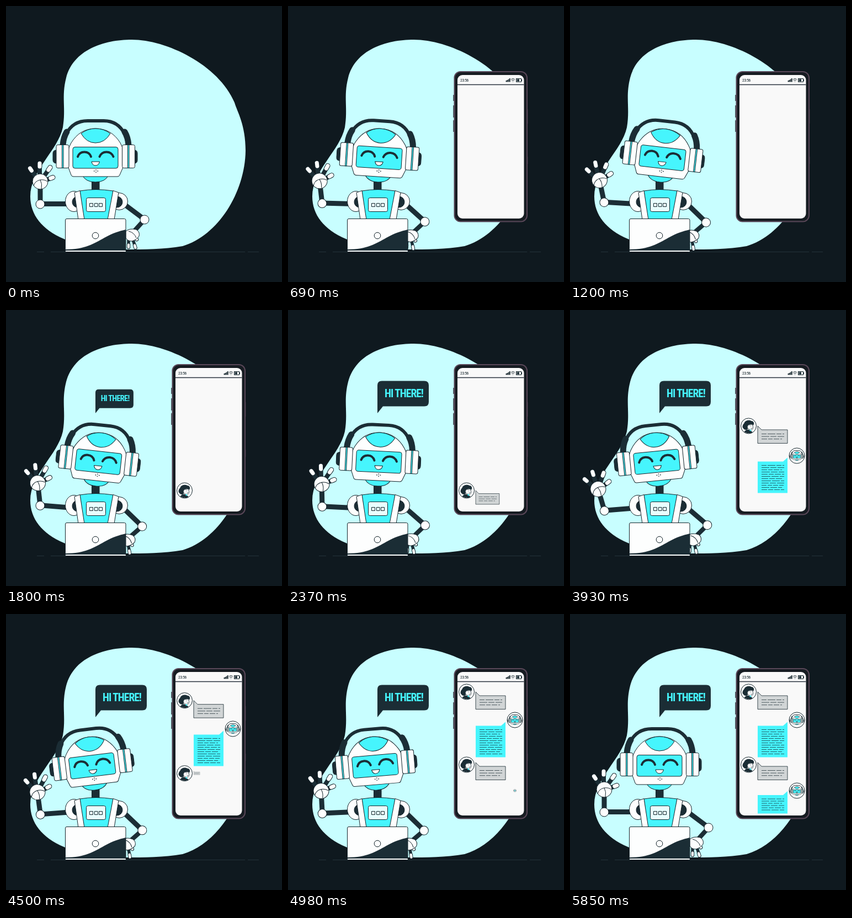
An HTML page that plays this animation: 500x500 px, repeating every 6120 ms.

```html
<!DOCTYPE html>
<html lang="en">
<head>
<meta charset="utf-8">
<title>Robot chat</title>
<style>
  html, body { margin: 0; width: 100%; height: 100%; overflow: hidden; background: #0f191f; }
  svg { display: block; width: 100vw; height: 100vh; }
  .ink { stroke: #14242b; stroke-width: 1; stroke-linejoin: round; }
  .w { fill: #fdfefe; }
  .c { fill: #46f5fd; }
  .d { fill: #1b2d35; }
  .bar { stroke: #1b2d35; fill: none; }
  .round { stroke-linecap: round; }
  text {
    font-family: "Roboto Condensed", "Liberation Sans Narrow", Roboto, "Liberation Sans", sans-serif;
    font-stretch: 75%; letter-spacing: -.05em; stroke: none; dominant-baseline: central;
  }
</style>
</head>
<body>
<svg viewBox="0 0 500 500">
  <path fill="#c8feff" d="M228 61C290 61 385 106 414 175C419 192 434 215 434 262C433 338 384 416 320 435C285 441 250 441 217 441C170 441 135 437 105 422C65 405 44 378 44 345C44 298 94 262 103 220C109 185 100 165 109 130C122 80 176 61 228 61Z"/>
  <path stroke="#24333a" d="M56 445.5H69M81 445.5H433M438 445.5H458"/>

  <g id="speech">
    <path class="d" d="M170 128.500H247Q255 128.500 255 136.500V166.500Q255 174.500 247 174.500H172L162 187V136.500Q162 128.500 170 128.500Z"/>
    <text x="175" y="151.500" font-size="25" font-weight="700" fill="#46f5fd" data-fit="70">HI THERE!</text>
  </g>

  <g id="phone">
    <path stroke="#2b2a35" stroke-width="1.500" d="M300 141V152M300 160V182M300 187V208M434 167V193M434 253V266"/>
    <rect x="301.500" y="99" width="131.500" height="271.500" rx="11" fill="#171c22" stroke="#594758" stroke-width="2"/>
    <rect x="307" y="105" width="120.500" height="260" rx="9" fill="#f9f9f9"/>
    <path stroke="#28313d" stroke-width="1.400" d="M307 122.500H427.500"/>
    <text x="312" y="114.500" font-size="8" fill="#14242b" data-fit="15">23:56</text>
    <path stroke="#14242b" stroke-width="1.700" d="M395.500 117.500V115M397.500 117.500V114M399.600 117.500V112.500M401.800 117.500V111"/>
    <path stroke="#14242b" fill="none" d="M404 113.500Q407.500 109.500 411 113.500M405.300 115.200Q407.500 112.700 409.700 115.200M407 117H408"/>
    <rect x="413.500" y="111.500" width="9" height="6" fill="none" stroke="#14242b"/>
    <path class="d" d="M414.500 112.500H419V116.500H414.500ZM423 113H424V116H423Z"/>
    <g id="chat"></g>
  </g>

  <g class="ink">
    <g id="armR">
      <path class="bar" stroke-width="9" d="M210 356L250 386"/>
      <path class="bar" stroke-width="8" d="M250 388L232 408"/>
      <circle class="w" cx="251" cy="387" r="8"/>
      <g id="handR"></g>
      <path class="w" d="M217 408Q224 402 236 405Q243 409 241 417Q236 424 228 426Q220 426 217 420Z"/>
      <path fill="none" d="M222 408Q232 410 236 420"/>
    </g>
    <circle class="w" cx="205" cy="354" r="15.500"/>
    <circle class="d" cx="201" cy="355" r="10"/>

    <g id="armL">
      <path class="bar" stroke-width="9" d="M62 358.500H118"/>
      <g id="fore">
        <path class="bar" stroke-width="9" d="M62 357V328"/>
        <g id="handL"></g>
        <circle class="w" cx="62" cy="318" r="14"/>
        <path fill="none" d="M50 326Q52 317 62 315Q70 314 75 318M62 315Q66 322 64 331"/>
      </g>
      <circle class="w" cx="62" cy="359" r="8"/>
    </g>
    <ellipse class="w" cx="123" cy="354" rx="15.500" ry="18.500"/>
    <circle class="d" cx="130" cy="355" r="10"/>

    <rect class="d" x="155.500" y="316" width="13.500" height="18"/>
    <path class="c" d="M134 335Q162 330 194 335L186 387H141Z"/>
    <path class="w" d="M124 338L134 334.500L142 387H131ZM194 334.500L204 338L196 387H184Z"/>
    <rect x="145.500" y="347.500" width="35" height="25" rx="3" fill="#e9ffff"/>
    <path fill="#e9ffff" d="M151.500 357.500h6v6h-6zM160.500 357.500h5.500v6h-5.500zM168.500 357.500h6v6h-6z"/>

    <g id="headTilt">
      <g id="head">
        <path class="c" d="M138 306Q144 319 162 319Q180 319 186 306Z"/>
        <path class="bar" stroke-width="6" d="M109 232C118 214 132 208 148 208H177C193 208 206 214 215 232"/>
        <path class="bar round" stroke-width="11" d="M103 252Q104 238 110 228M222 252Q221 238 215 228"/>
        <path class="d" d="M92 261Q85 261 85 267V279Q85 285 92 285ZM232 261Q238 261 238 267V279Q238 285 232 285Z"/>
        <path class="w" d="M112 290Q109 262 118 248Q134 222 162 222Q191 222 207 248Q216 262 213 290L206 306Q205 309 202 309H122Q119 309 118 306Z"/>
        <path class="c" d="M136 231Q148 222 162 222Q177 222 189 231Q179 248 162 248Q146 248 136 231Z"/>
        <rect class="c" x="121" y="255.500" width="82" height="38.500" rx="4"/>
        <path class="bar round" stroke-width="4" d="M130 273Q133 264.500 142 264.500Q151 264.500 154 273M169.500 273Q173 264.500 182 264.500Q191 264.500 194.500 273"/>
        <path class="w" d="M155 282H169.500Q168 289 162 289Q156.500 289 155 282Z"/>
        <path class="bar round" stroke-width="1.700" d="M163 297h.1M159.700 299h.1M166.200 299h.1M163 301h.1"/>
        <rect class="w" x="91" y="251.500" width="23" height="42" rx="3"/>
        <rect class="w" x="210.500" y="251.500" width="23" height="42" rx="3"/>
        <path class="c" d="M101.500 251.500h2.500v42h-2.500zM220.500 251.500h2.500v42h-2.500z"/>
      </g>
    </g>

    <rect class="w" x="107.500" y="385.500" width="109.500" height="60" rx="2.500"/>
    <path class="d" stroke="none" d="M108 441C143 441 160 430 178 420C194 411 205 408 217 405V443H108Z"/>
    <path stroke="#fdfefe" stroke-width="1.500" d="M108 444.200H217"/>
    <circle class="w" cx="162" cy="416" r="5.800"/>
  </g>
</svg>
<script>
const $ = id => document.getElementById(id);
const LOOP = 6120, END = 5850, STEP = 30;

const smooth = p => (p = Math.min(1, Math.max(0, p)), p * p * (3 - 2 * p));
const ramp = (t, start, length) => smooth((t - start) / length);

// Eased path through [time, value] points
function track(t, keys) {
  let v = keys[0][1];
  for (let i = 1; i < keys.length; i++) {
    const [t0, v0] = keys[i - 1], [t1, v1] = keys[i];
    if (t >= t0) v = v0 + (v1 - v0) * ramp(t, t0, t1 - t0);
  }
  return v;
}

// Fingers: dark joint with a white outlined tip
function finger(x0, y0, x1, y1, width, tip) {
  const mx = x1 + (x0 - x1) * tip, my = y1 + (y0 - y1) * tip;
  const line = (x, y, color, w) =>
    `<path class="round" style="stroke:${color};stroke-width:${w}" d="M${x} ${y}L${x1} ${y1}"/>`;
  return line(x0, y0, '#1b2d35', width + 1) + line(mx, my, '#14242b', width + 2) + line(mx, my, '#fdfefe', width);
}
$('handL').innerHTML = [[55, 311, 43.5, 294], [61, 309, 61, 285], [67, 311, 80, 292.5], [68, 317, 85, 310.5]]
  .map(f => finger(...f, 7, .25)).join('');
$('handR').innerHTML = [[222, 419, 222, 437], [229, 420, 234.5, 438], [233, 415, 237, 423]]
  .map(f => finger(...f, 4.5, .25)).join('');

// Chat pieces, drawn around their own origin
function writing(count, top, step) {
  let rows = '';
  for (let i = 0; i < count; i++) {
    const y = top + i * step, end = i % 4 == 2 ? 384 : 388;
    rows += `<path stroke="#14242b" stroke-width=".7" stroke-dasharray="${9 + i * 5 % 9} 2 ${14 - i * 3 % 7} 2" d="M347 ${y}H${end}"/>`;
  }
  return rows;
}
const disc = '<circle class="w ink" r="14"/>';
const user = disc + `
  <path class="d" d="M-9 5C-13 2-10-3-8-5C-6-11 2-11 5-9C10-9 11-3 8-1L5-3L0-2L-1 4C-2 8-7 8-9 5Z"/>
  <path class="w ink" style="stroke-width:.7" d="M0-2Q4-1 7-3Q10 4 6 7Q3 8 1 6L-2 4Q-3 0 0-2Z"/>
  <path class="d" d="M-8 11Q-4 5 1 7Q6 9 7 12Q0 15-8 11Z"/>
  <path class="bar" stroke-width=".8" d="M3 1h1M6 0h1M4 4.500Q6 5 7 3.500"/>
  <path class="c" d="M1 8L4 6L5 10Z"/>`;
const robot = disc + '<use href="#head" class="ink" style="stroke-width:3.500" transform="scale(.165) translate(-162 -266)"/>';
const ask = '<path class="ink" style="stroke-width:.8" fill="#d1d5d6" d="M340-7L347 0H394V24.500H340Z"/>' + writing(3, 7.5, 4.6);
const reply = (height, rows) =>
  `<path class="c" d="M340 0H386L394-7V${height}H340Z"/>` + writing(rows, 7, 4);

// x and y of the pop origin, offset in the list, start time, drawing, late rows close up a little
const items = [
  { x: 323.5, at: 0, start: 720, art: user },
  { px: 340, at: 7, start: 2080, art: ask },
  { x: 411, at: 51, start: 2950, art: robot, gap: 3 },
  { px: 394, at: 61.5, start: 3350, art: reply(57, 12), gap: 3 },
  { x: 323.5, at: 132, start: 3980, art: user },
  { px: 340, at: 135, start: 4380, art: ask },
  { x: 411, at: 179, start: 4865, art: robot },
  { px: 394, at: 187, start: 5250, art: reply(33.5, 6) }
];
for (const item of items) {
  item.node = document.createElementNS('http://www.w3.org/2000/svg', 'g');
  item.node.innerHTML = item.art;
  $('chat').append(item.node);
}

// Pick the largest type size that fits its space
for (const label of document.querySelectorAll('[data-fit]')) {
  const size = +label.getAttribute('font-size');
  label.setAttribute('font-size', size * Math.min(1, label.dataset.fit / label.getComputedTextLength()));
}

const move = (node, value) => node.setAttribute('transform', value);
const popAt = (x, y, s) => `translate(${x} ${y}) scale(${s}) translate(${-x} ${-y})`;

function draw(t) {
  const s = Math.sin(2 * Math.PI * t / END);
  const sway = s * (.35 + .65 * Math.abs(s));
  move($('headTilt'), `rotate(${7 * sway} 162 323)`);

  const lift = track(t, [[0, 0], [1900, 4.7], [2950, 0], [4100, -5], [END, 0]]);
  const wave = track(t, [[0, 0], [1275, -12], [2300, -1], [3650, -18], [5000, -3], [END, 0]]);
  move($('armL'), `rotate(${lift} 120 356)`);
  move($('fore'), `rotate(${wave - lift} 62 359)`);

  const half = t / END * 2;
  const swing = Math.sin(Math.PI * (half < 1 ? half : (half - 1) ** 1.7));
  move($('armR'), `rotate(${7.5 * swing} 208 354)`);

  const rise = 20 * (1 - ramp(t, 1300, 500));
  move($('phone'), `translate(0 ${rise}) ` + popAt(367, 235, ramp(t, 60, 560)));
  move($('speech'), popAt(162, 187, ramp(t, 1500, 450)));

  // The first portrait is already in place while the phone is still low
  const top = track(t, [[2370, 327], [2750, 314], [2900, 314], [3750, 210], [3940, 210], [4750, 141]]);
  const loose = 1 - ramp(t, 3940, 700);
  for (const { node, x, px, at, start, gap = 0 } of items) {
    const y = top + at + gap * loose, size = ramp(t, start, 410);
    move(node, x ? `translate(${x} ${y}) scale(${size})` : `translate(0 ${y}) ` + popAt(px, -7, size));
  }
}

function tick() {
  const t = performance.now() % LOOP;
  draw(Math.min(END, Math.floor(t / STEP) * STEP));
  requestAnimationFrame(tick);
}
tick();
</script>
</body>
</html>
```
